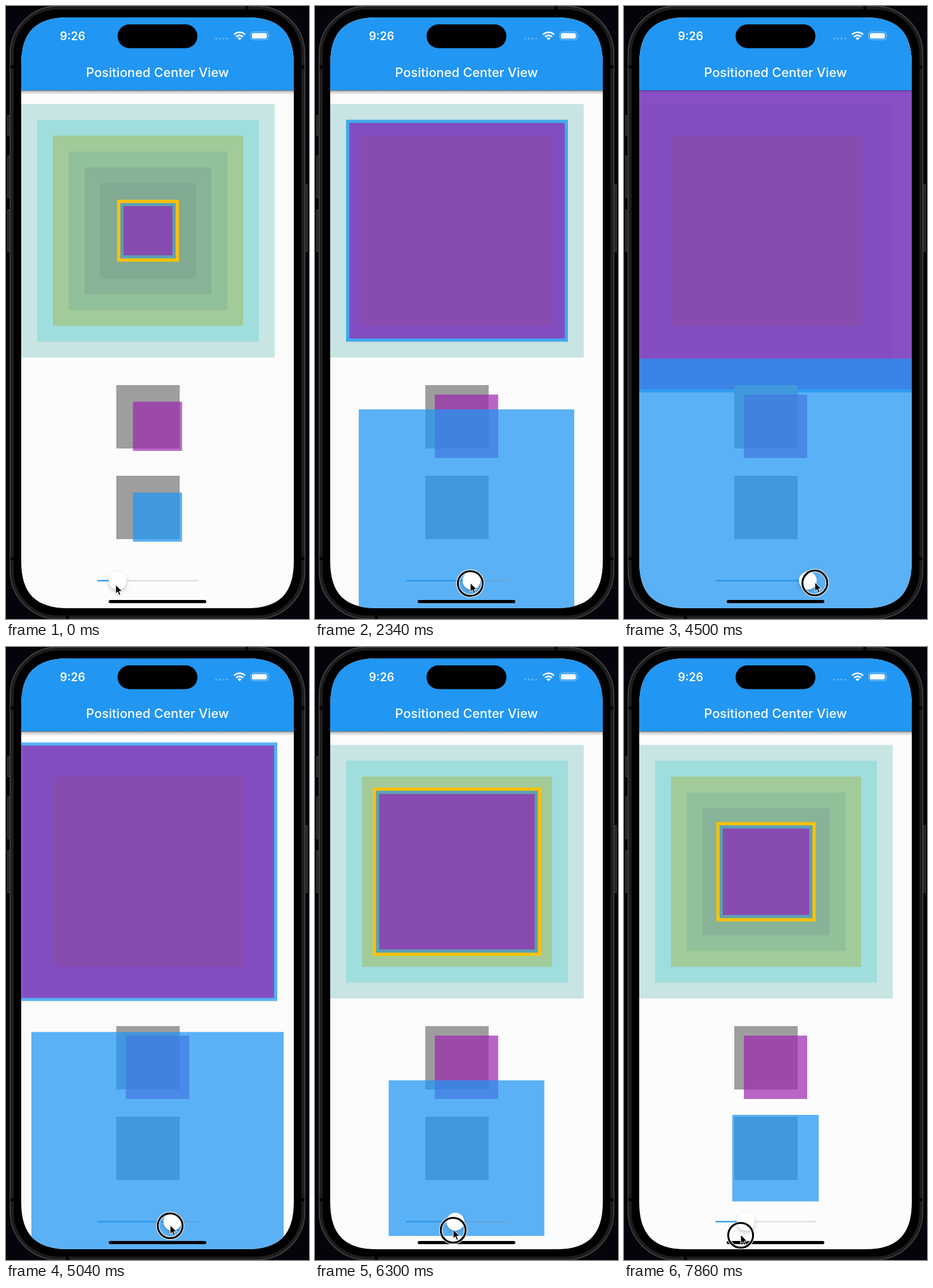
An HTML page for the animation above (8000 ms loop, 478 by 967 pixels).

```html
<!DOCTYPE html>
<html lang="en">
<head>
<meta charset="utf-8">
<title>Positioned Center View</title>
<style>
  html, body { margin: 0; width: 100%; height: 100%; overflow: hidden; background: #04050b; }
  svg { display: block; width: 478px; height: 967px; }
  text { font-family: Inter, "Liberation Sans", sans-serif; fill: #fff; text-anchor: middle; }
</style>
</head>
<body>
<svg viewBox="0 0 478 967" xmlns="http://www.w3.org/2000/svg">
  <defs>
    <clipPath id="screen">
      <path d="M24 92C24 41 47 18 98 18H380C431 18 454 41 454 92V876C454 927 431 950 380 950H98C47 950 24 927 24 876z"/>
    </clipPath>
    <linearGradient id="shade" x2="0" y2="1">
      <stop offset="0" stop-opacity=".32"/>
      <stop offset=".45" stop-opacity=".16"/>
      <stop offset="1" stop-opacity="0"/>
    </linearGradient>
    <filter id="lift" x="-50%" y="-50%" width="200%" height="200%">
      <feDropShadow dx="0" dy="3" stdDeviation="3" flood-opacity=".22"/>
    </filter>
  </defs>

  <!-- phone body -->
  <g fill="#242424" stroke="#3c3c3c">
    <rect x="2.5" y="172.5" width="6" height="32"/>
    <rect x="2.5" y="236.5" width="6" height="66"/>
    <rect x="2.5" y="321.5" width="6" height="66"/>
    <rect x="469.5" y="281.5" width="6" height="106"/>
  </g>
  <rect x="6.5" y="0" width="465" height="967" rx="76" fill="#1d1d1d" stroke="#4a4a4a" stroke-width="1.3"/>
  <path d="M7 96h6M7 872h6M465 96h6M465 872h6M380 0v6M97 961v6" stroke="#050505" stroke-width="5"/>
  <rect x="12" y="5.5" width="454" height="956" rx="70" fill="#000"/>

  <g clip-path="url(#screen)">
    <rect x="24" y="18" width="430" height="932" fill="#fcfcfc"/>
    <rect x="24" y="133" width="430" height="7" fill="url(#shade)"/>
    <g id="nest"></g>
    <rect id="amber" fill="#ffc107"/>
    <rect id="frame" fill="#2196f3" opacity=".735"/>
    <rect id="core" fill="#9c27b0" opacity=".7"/>
    <rect x="174" y="598" width="100" height="100" fill="#9e9e9e"/>
    <rect id="small" fill="#9c27b0" opacity=".7"/>
    <rect x="174" y="741" width="100" height="100" fill="#9e9e9e"/>
    <rect id="large" fill="#2196f3" opacity=".735"/>

    <rect x="144" y="905.5" width="160" height="2" rx="1" fill="#787880" opacity=".25"/>
    <rect id="track" x="144" y="905.5" height="2" rx="1" fill="#2196f3"/>
    <circle id="thumb" cy="906.5" r="14" fill="#fff" filter="url(#lift)"/>

    <rect x="24" y="133" width="430" height="1" opacity=".3"/>
    <rect x="24" y="18" width="430" height="115" fill="#2196f3"/>
    <text x="239" y="112" font-size="20" font-weight="500" letter-spacing=".1">Positioned Center View</text>
    <text x="105" y="53.5" font-size="18" font-weight="600">9:26</text>
    <rect x="176" y="29" width="126" height="37.5" rx="18.7"/>
    <g fill="#fff">
      <g opacity=".35">
        <circle cx="331.5" cy="51.5" r="1.4"/><circle cx="337.3" cy="51.5" r="1.4"/>
        <circle cx="343.1" cy="51.5" r="1.4"/><circle cx="348.9" cy="51.5" r="1.4"/>
      </g>
      <path d="M368.5 54l-3.2-3.2a4.6 4.6 0 0 1 6.4 0z"/>
      <rect x="388" y="42.7" width="23.5" height="8.6" rx="2.6"/>
      <path d="M416 45.2q1.6 1.8 0 3.6z" opacity=".5"/>
    </g>
    <g fill="none" stroke="#fff">
      <path d="M359.8 45.1a12.4 12.4 0 0 1 17.4 0M363 48.6a7.8 7.8 0 0 1 11 0" stroke-width="2.5"/>
      <rect x="386.2" y="40.8" width="27.6" height="12.4" rx="4" opacity=".5"/>
    </g>
    <rect x="162" y="937" width="154" height="5" rx="2.5"/>
  </g>

  <g id="cursor">
    <g id="ring" fill="none">
      <circle r="19.6" stroke="#fff" stroke-width="5"/>
      <circle r="19.6" stroke="#000" stroke-width="3"/>
    </g>
    <path d="M0-1v14.2l3.2-3 2.4 5.4 2.4-1-2.3-5.3h4.5z" stroke="#fff" stroke-width="1"/>
  </g>
</svg>
<script>
const $ = id => document.getElementById(id);
const LOOP = 8000, STEP = 60, PRESS = 120;

// time, pointer x, pointer y, square size
const KEYS = [
  [0, 173, 914, 77.5],
  [300, 173, 914, 77.5],
  [1260, 206, 911, 193.5],
  [1740, 229, 911, 285],
  [2100, 245, 911, 340],
  [2340, 245, 911, 340],
  [3120, 264, 910, 413],
  [3240, 288, 909, 500],
  [3480, 336, 908, 500],
  [4020, 336, 908, 500],
  [4680, 288, 911, 500],
  [5040, 259, 913, 398],
  [6300, 218, 920, 245.5],
  [7380, 188, 923, 136.5],
  [7860, 184, 928, 136.5],
  [8000, 184, 928, 136.5]
];

function set(el, attrs) {
  for (const name in attrs) el.setAttribute(name, attrs[name]);
}

function square(el, cx, cy, size) {
  set(el, { x: cx - size / 2, y: cy - size / 2, width: size, height: size });
}

const TOP = [224, 354.5];
["#c8e5e3", "#9fdedc", "#a1cb99", "#91c19b", "#88b397", "#81aa92"].forEach((fill, i) => {
  const el = document.createElementNS("http://www.w3.org/2000/svg", "rect");
  square(el, ...TOP, 400 - 50 * i);
  set(el, { fill });
  $("nest").append(el);
});

function stateAt(t) {
  const i = KEYS.findIndex(key => key[0] > t);
  const a = KEYS[i - 1], b = KEYS[i];
  const k = (t - a[0]) / (b[0] - a[0]);
  return a.map((v, j) => v + (b[j] - v) * k);
}

function draw(t) {
  const [, x, y, size] = stateAt(t);
  square($("amber"), ...TOP, Math.min(size + 20, 300));
  square($("frame"), ...TOP, size + 10);
  square($("core"), ...TOP, size);
  square($("small"), 239, 663, Math.min(size, 100));
  square($("large"), 239, 806.3, size);

  const thumb = 158 + (size - 10) / 490 * 132;
  set($("thumb"), { cx: thumb });
  set($("track"), { width: thumb - 144 });
  set($("cursor"), { transform: `translate(${x} ${y})` });
  set($("ring"), { visibility: t < PRESS ? "hidden" : "visible" });
}

const start = performance.now();
function tick() {
  const t = (performance.now() - start) % LOOP;
  draw(Math.floor(t / STEP) * STEP);
  requestAnimationFrame(tick);
}
tick();
</script>
</body>
</html>
```
